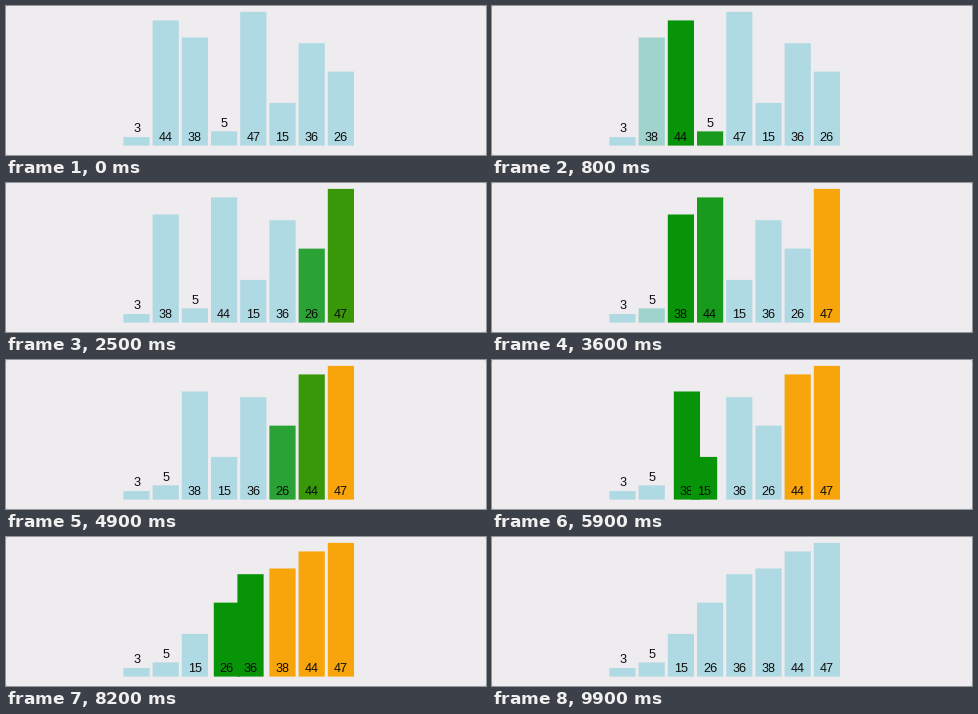
Animation of 480x149 px, one loop 10000 ms. Source, as a matplotlib script:

```python
import math

import matplotlib.pyplot as plt
import numpy as np
from matplotlib.animation import FuncAnimation
from matplotlib.colors import to_rgb
from matplotlib.patches import FancyBboxPatch, Rectangle

W, H, DPI = 480, 149, 100
FRAMES, INTERVAL = 100, 100
START, STEP = 40, 200          # ms before the first step, ms per step
RESET = 9850                   # ms at which the sorted colours are cleared

VALUES = [3, 44, 38, 5, 47, 15, 36, 26]
LEFT, PITCH, BAR_W = 117.4, 29.2, 26.2
BASE, UNIT = 139.6, 2.845

BACK, EDGE, INK = "#eeecee", "#cfcdcf", "#0c0c0c"
IDLE, ACTIVE, DONE = (np.array(to_rgb(c)) for c in ("#b0dae3", "#089408", "#f7a50a"))


def bubble_states(values):
    """Return a list of (slot, colour) arrays, one row per bar."""
    n = len(values)
    order = list(range(n))
    done = set()
    states = []

    def push(active=()):
        slots = np.argsort(order).astype(float)
        colors = [DONE if i in done else ACTIVE if i in active else IDLE
                  for i in range(n)]
        states.append((slots, np.array(colors)))

    for last in range(n - 1, 0, -1):
        push()
        swapped = False
        for j in range(last):
            pair = order[j:j + 2]
            push(pair)
            if values[pair[0]] > values[pair[1]]:
                order[j:j + 2] = pair[::-1]
                swapped = True
                push(pair)
        done.add(order[last])
        push()
        if not swapped:
            break
    done.update(order)
    push()
    return states


def ease(t):
    return (1 - math.cos(math.pi * t)) / 2


def pose(ms):
    u = min(max((ms - START) / STEP, 0), len(STATES) - 1)
    k = min(int(u), len(STATES) - 2)
    e = ease(u - k)
    (s0, c0), (s1, c1) = STATES[k], STATES[k + 1]
    slots, colors = s0 + (s1 - s0) * e, c0 + (c1 - c0) * e
    if ms >= RESET:
        colors = np.tile(IDLE, (len(VALUES), 1))
    return slots, colors


STATES = bubble_states(VALUES)

fig = plt.figure(figsize=(W / DPI, H / DPI), dpi=DPI, facecolor=EDGE)
ax = fig.add_axes([0, 0, 1, 1])
ax.set_xlim(0, W)
ax.set_ylim(H, 0)
ax.axis("off")
ax.add_patch(FancyBboxPatch((0, 0), W, H, fc=BACK, lw=0,
                            boxstyle="round,pad=0,rounding_size=2.5"))

bars, labels = [], []
for i, v in enumerate(VALUES):
    top = BASE - v * UNIT
    bars.append(ax.add_patch(Rectangle((0, top), BAR_W, v * UNIT, lw=0,
                                       snap=False, zorder=2 + i)))
    y = top - 4.8 if v < 10 else 135
    labels.append(ax.text(0, y, str(v), ha="center", va="baseline", color=INK,
                          family="Liberation Sans", size=12.6 * 72 / DPI,
                          zorder=2.5 + i))


def draw(frame):
    slots, colors = pose(frame * INTERVAL)
    for bar, label, slot, color in zip(bars, labels, slots, colors):
        x = LEFT + PITCH * slot
        bar.set_x(x)
        bar.set_facecolor(color)
        label.set_x(x + BAR_W / 2)
    return bars + labels


anim = FuncAnimation(fig, draw, frames=FRAMES, interval=INTERVAL,
                     init_func=lambda: draw(0), repeat=True, repeat_delay=0)
plt.show()
```
